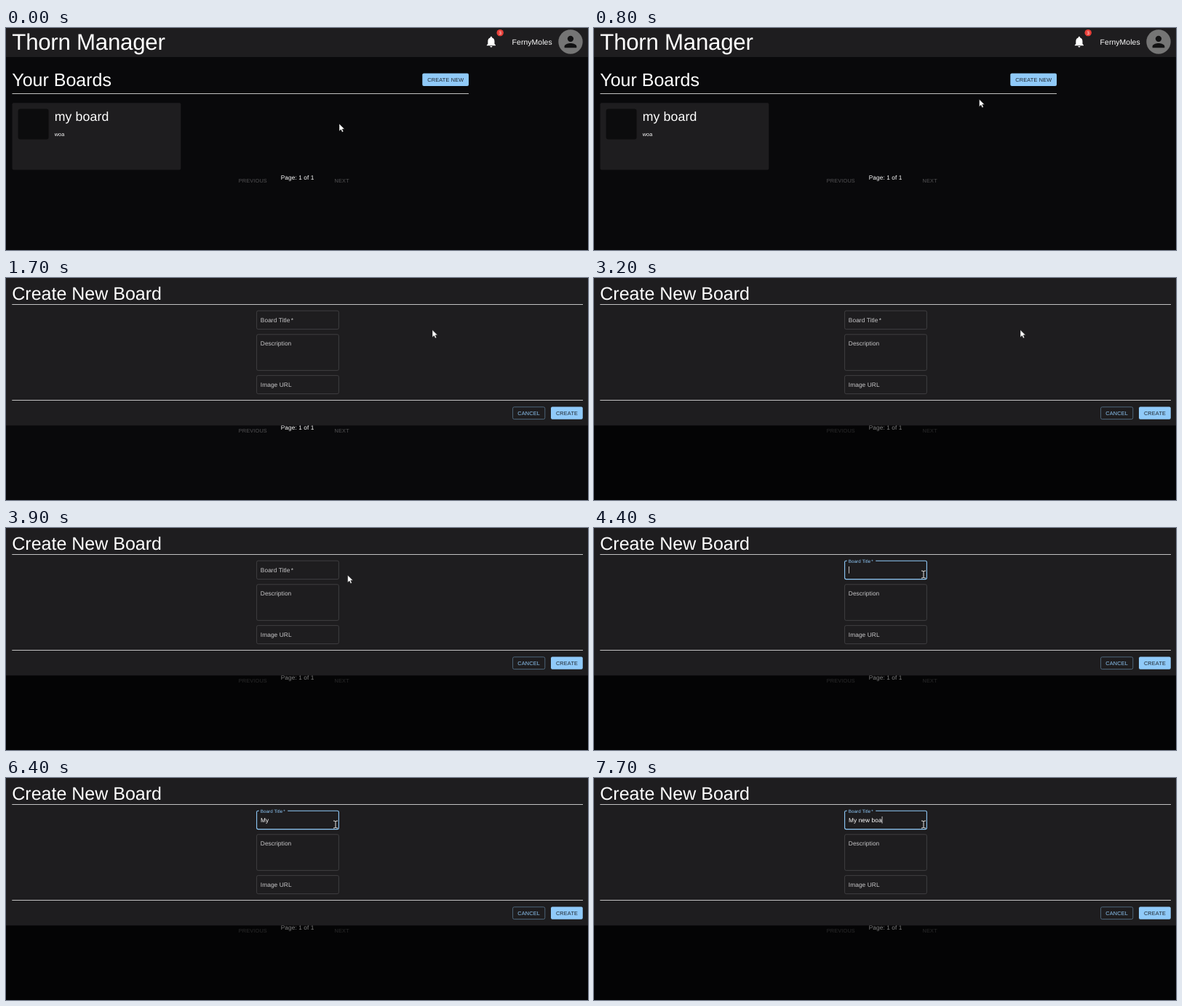
Write an HTML page that moves like this. It is 800x306 px and loops after 8000 ms.

```html
<!DOCTYPE html>
<html lang="en">
<head>
<meta charset="utf-8">
<title>Create board</title>
<style>
  html, body { margin: 0; width: 100%; height: 100%; overflow: hidden; background: #09090b; }
  svg { display: block; width: 100%; height: 100%; }
  text { font-family: "Liberation Sans", Arial, sans-serif; fill: #fff; text-rendering: geometricPrecision; white-space: pre; }
  .h2 { font-size: 31.25px; letter-spacing: -.26px; }
  .h3 { font-size: 25px; }
  .h4 { font-size: 17.7px; letter-spacing: .13px; }
  .h6 { font-size: 10.42px; letter-spacing: .078px; }
  .body { font-size: 8.33px; letter-spacing: .078px; }
  .small { font-size: 7.29px; letter-spacing: .078px; }
  .btn { font-size: 7.29px; letter-spacing: .208px; text-anchor: middle; }
  .off { fill: #555456; }
  .dark { fill: #1b2229; }
  .blue { fill: #90caf9; }
  .label { fill: #c9c8ca; }
  .paper { fill: #1e1d1f; }
  .rule { stroke: #c2c2c2; stroke-width: 1; }
  .field { fill: none; stroke: #48474a; stroke-width: .8; }
  .field.hover { stroke: #fff; }
  .field.focus { stroke: #90caf9; stroke-width: 1.1; }
</style>
</head>
<body>
<svg viewBox="0 0 800 306">
  <defs>
    <clipPath id="buttonClip"><rect x="572.3" y="62.5" width="63.7" height="17.5" rx="2"/></clipPath>
  </defs>

  <g id="boards">
    <rect class="paper" width="800" height="40"/>
    <text class="h2" x="8.3" y="30">Thorn Manager</text>
    <path transform="translate(657.8 9.8) scale(.76)" fill="#fff" d="M12 22c1.1 0 2-.9 2-2h-4c0 1.1.89 2 2 2zm6-6v-5c0-3.07-1.64-5.64-4.5-6.32V4c0-.83-.67-1.5-1.5-1.5s-1.5.67-1.5 1.5v.68C7.63 5.36 6 7.92 6 11v5l-2 2v1h16v-1l-2-2z"/>
    <circle cx="679.2" cy="6.6" r="4.7" fill="#e8403a"/>
    <text x="679.2" y="8.9" font-size="6.25" text-anchor="middle">3</text>
    <text class="h6" x="695.6" y="23">FernyMoles</text>
    <circle cx="776" cy="19" r="16.7" fill="#757575"/>
    <g transform="translate(763.5 6.5) scale(1.04)" fill="#121213">
      <circle cx="12" cy="8" r="4"/>
      <path d="M12 14c-2.67 0-8 1.34-8 4v2h16v-2c0-2.66-5.33-4-8-4z"/>
    </g>

    <text class="h3" x="8.3" y="80">Your Boards</text>
    <g clip-path="url(#buttonClip)">
      <rect class="blue" x="572" y="62" width="65" height="19"/>
      <circle id="ripple" cx="587" cy="72" fill="#000"/>
    </g>
    <text class="btn dark" x="604.3" y="74">CREATE NEW</text>
    <path class="rule" d="M8.5 90.5H636"/>

    <rect class="paper" x="8.5" y="103.3" width="231.8" height="92.2" rx="2"/>
    <rect x="16.6" y="111.5" width="42" height="42" rx="3" fill="#0c0c0d"/>
    <text class="h4" x="66.7" y="128">my board</text>
    <text class="small" x="66.7" y="149.2">woa</text>
  </g>

  <text class="btn off" x="339.3" y="213.2">PREVIOUS</text>
  <text class="body" x="377.7" y="209.3">Page: 1 of 1</text>
  <text class="btn off" x="461.7" y="213.2">NEXT</text>
  <rect id="backdrop" width="800" height="306"/>

  <g id="dialog">
    <rect class="paper" width="800" height="203.3"/>
    <text class="h3" x="8.3" y="29.5">Create New Board</text>
    <path class="rule" d="M8.3 36.5H793M8.3 168.5H793"/>
    <rect class="field" id="titleField" x="344.6" y="45.2" width="112.8" height="25.4" rx="2"/>
    <rect class="paper" id="notch" x="347.8" y="44" height="2.4"/>
    <text class="body label" id="titleLabel">Board Title<tspan dx="1.4">*</tspan></text>
    <text class="body" id="typed" x="350" y="60.5"></text>
    <rect id="caret" y="53" width=".7" height="9.6" fill="#fff"/>
    <rect class="field" x="344.6" y="77.8" width="112.8" height="49.6" rx="2"/>
    <text class="body label" x="349.8" y="93">Description</text>
    <rect class="field" x="344.6" y="134.4" width="112.8" height="25.2" rx="2"/>
    <text class="body label" x="349.8" y="149.6">Image URL</text>
    <rect x="696.6" y="177.8" width="44.2" height="16.8" rx="2" fill="none" stroke="#5a7690" stroke-width=".8"/>
    <text class="btn blue" x="718.7" y="188.7">CANCEL</text>
    <rect class="blue" x="749" y="177.5" width="43.8" height="17.3" rx="2"/>
    <text class="btn dark" x="771" y="188.7">CREATE</text>
  </g>

  <path id="arrow" d="M0 0V10.2L2.4 8 4 11.6 5.8 10.8 4.2 7.3H7.3Z" fill="#fff" stroke="#111" stroke-width=".5"/>
  <g id="beam" fill="none">
    <path d="M-3-5Q0-5 0-4Q0-5 3-5M0-4V4M-3 5Q0 5 0 4Q0 5 3 5" stroke="#000" stroke-width="2"/>
    <path d="M-3-5Q0-5 0-4Q0-5 3-5M0-4V4M-3 5Q0 5 0 4Q0 5 3 5" stroke="#fff" stroke-width="1"/>
  </g>
</svg>

<script>
const LOOP = 8000, OPEN = 1650, ENTER = 4100, FOCUS = 4250;
const BLINK = 500;

// time, x, y
const pointerPath = [
  [100, 458, 132], [1400, 586, 71.5], [3200, 586, 71.5], [4100, 453, 64]
];
// time, text in the field
const typing = [
  [FOCUS + 100, ""], [5100, "M"], [5400, "My"], [5500, "My "],
  [6600, "My n"], [6670, "My new"], [7000, "My new "],
  [7400, "My new b"], [7600, "My new bo"], [7700, "My new boa"]
];

const $ = id => document.getElementById(id);
const set = (id, attrs) => {
  for (const key in attrs) $(id).setAttribute(key, attrs[key]);
};
const show = (id, on) => set(id, { visibility: on ? "visible" : "hidden" });
const progress = (t, from, to) => Math.min(1, Math.max(0, (t - from) / (to - from)));
const mix = (a, b, p) => a + (b - a) * p;
const easeInOut = p => p * p * (3 - 2 * p);
const easeOut = p => 1 - (1 - p) ** 3;

function pointerAt(t) {
  let [, x, y] = pointerPath[0];
  for (let i = 1; i < pointerPath.length; i++) {
    const [from] = pointerPath[i - 1];
    const [to, nextX, nextY] = pointerPath[i];
    const p = easeInOut(progress(t, from, to));
    x = mix(x, nextX, p);
    y = mix(y, nextY, p);
  }
  return `translate(${x} ${y})`;
}

function renderField(t) {
  const focused = t >= FOCUS;
  const p = easeOut(progress(t, FOCUS, FOCUS + 150));
  $("titleField").setAttribute("class", "field" + (focused ? " focus" : t >= ENTER ? " hover" : ""));
  $("titleLabel").setAttribute("class", "body " + (focused ? "blue" : "label"));
  set("titleLabel", { transform: `translate(349.8 ${mix(60.5, 47.7, p)}) scale(${mix(1, .75, p)})` });
  set("notch", { width: 39.4 * p });

  const [typedAt, text] = typing.findLast(([time]) => time <= t) || [Infinity, ""];
  $("typed").textContent = text;
  const width = text ? $("typed").getComputedTextLength() : 0;
  set("caret", { x: 350 + width });
  const blinkOn = Math.floor((t - typedAt) / BLINK) % 2 === 0;
  show("caret", t >= typedAt && blinkOn && !(t >= 6000 && t < 6600));
}

function render(t) {
  const open = t >= OPEN;
  $("boards").style.display = open ? "none" : "";
  $("dialog").style.display = open ? "" : "none";
  set("backdrop", { opacity: .5 * easeInOut(progress(t, 1700, 1950)) });

  const ripple = progress(t, 1480, 1700);
  set("ripple", { r: 52 * ripple, opacity: ripple ? mix(.1, .26, ripple) : 0 });

  const overField = t >= ENTER;
  for (const id of ["arrow", "beam"]) set(id, { transform: pointerAt(t) });
  show("arrow", !overField);
  show("beam", overField);
  if (open) renderField(t);
  else show("caret", false);
}

const start = performance.now();
function tick() {
  render((performance.now() - start) % LOOP);
  requestAnimationFrame(tick);
}
tick();
</script>
</body>
</html>
```
